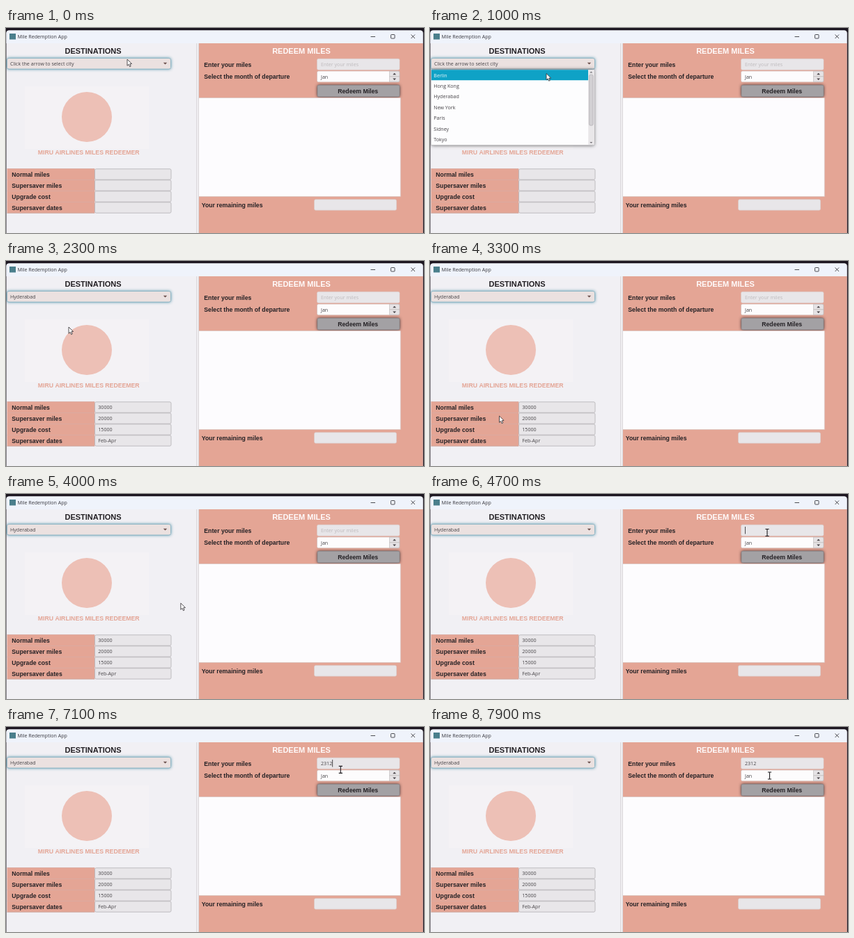
Write an HTML page with a canvas that moves like this. It is 600 px wide and 295 px high and loops after 8000 ms.

```html
<!DOCTYPE html>
<html lang="en">
<head>
<meta charset="utf-8">
<title>Mile Redemption App</title>
<style>
  html, body { margin: 0; width: 100%; height: 100%; overflow: hidden; background: #1c1620; }
  canvas { display: block; width: 600px; height: 295px; }
</style>
</head>
<body>
<canvas id="stage"></canvas>
<script>
const canvas = document.getElementById('stage');
const ctx = canvas.getContext('2d');
const ratio = window.devicePixelRatio || 1;
canvas.width = 600 * ratio;
canvas.height = 295 * ratio;

const LOOP = 8000, TICK = 100;
const OPEN = 400, PICK = 2200, FOCUS = 4400;
const KEYS = [6500, 6700, 6900, 7100];
const TYPED = '2312';
const BLINK = 500;
const UI = '"Open Sans", "Noto Sans", sans-serif';
const BOLD = '"Liberation Sans", Arial, sans-serif';
const PINK = '#e4a595', INK = '#242125', GREY = '#e8e6e9';
const CITIES = ['Berlin', 'Hong Kong', 'Hyderabad', 'New York', 'Paris', 'Sidney', 'Tokyo'];
const ROWS = [
  ['Normal miles', '30000'],
  ['Supersaver miles', '20000'],
  ['Upgrade cost', '15000'],
  ['Supersaver dates', 'Feb-Apr']
];
const LIST_Y = 60.2, ROW_H = 15.4;

// Pointer stops: time, x, y
const PATH = [
  [0, 174, 45], [400, 174, 45], [1000, 167, 65.5], [1100, 167, 65.5],
  [1600, 90, 94], [2300, 90, 95], [3000, 99.5, 223], [3700, 99.5, 223],
  [4400, 484, 55.5], [4800, 484, 55.5], [6200, 480, 61],
  [7000, 480, 61], [7800, 487.5, 70], [8000, 487.5, 70]
];

function pointer(t) {
  const i = Math.max(1, PATH.findIndex(p => p[0] > t));
  const [t0, x0, y0] = PATH[i - 1], [t1, x1, y1] = PATH[i];
  const k = (t - t0) / (t1 - t0), e = k * k * (3 - 2 * k);
  return { x: x0 + (x1 - x0) * e, y: y0 + (y1 - y0) * e };
}

function rect(x, y, w, h, fill) {
  ctx.fillStyle = fill;
  ctx.fillRect(x, y, w, h);
}

function box(x, y, w, h, r, fill, stroke, line = 0.8) {
  ctx.beginPath();
  ctx.roundRect(x, y, w, h, r);
  if (fill) { ctx.fillStyle = fill; ctx.fill(); }
  if (stroke) { ctx.strokeStyle = stroke; ctx.lineWidth = line; ctx.stroke(); }
}

function glow(color, blur, draw) {
  ctx.save();
  ctx.shadowColor = color;
  ctx.shadowBlur = blur * ratio;
  draw();
  ctx.restore();
}

function poly(points, fill) {
  ctx.beginPath();
  points.forEach(([x, y]) => ctx.lineTo(x, y));
  ctx.closePath();
  ctx.fillStyle = fill;
  ctx.fill();
}

function lines(color, width, ...segs) {
  ctx.beginPath();
  for (const [x0, y0, x1, y1] of segs) { ctx.moveTo(x0, y0); ctx.lineTo(x1, y1); }
  ctx.strokeStyle = color;
  ctx.lineWidth = width;
  ctx.stroke();
}

function text(str, x, y, color = '#474448', font = '7.1px ' + UI, align = 'left') {
  ctx.font = font;
  ctx.textAlign = align;
  ctx.fillStyle = color;
  ctx.fillText(str, x, y);
}

const bold = (str, x, y, color = INK, size = 8.7, align = 'left') =>
  text(str, x, y, color, `bold ${size}px ${BOLD}`, align);

// dir: 1 points down, -1 points up
function arrow(x, y, dir, size, color) {
  poly([[x - size, y - dir * size / 2], [x + size, y - dir * size / 2], [x, y + dir * size / 2]], color);
}

function drawWindow() {
  rect(0, 0, 600, 295, '#1c1620');
  box(0.5, 3.5, 598, 300, 4, '#f1f0f4');
  box(0.5, 3.5, 598, 18.5, [4, 4, 0, 0], '#eff3fb');
  rect(5, 8, 9, 8.5, '#4a7f8c');
  text('Mile Redemption App', 16.5, 15, '#3a3a40');
  lines('#3a3a40', 0.9,
    [523.5, 12.5, 530, 12.5], [581.5, 9.5, 587, 15], [587, 9.5, 581.5, 15]);
  box(552.5, 9.5, 5.5, 5.5, 0.8, null, '#3a3a40', 0.9);
  rect(273, 22, 4, 273, '#dcd9dc');
  rect(274, 22, 2, 273, '#efedf0');
  rect(277, 22, 321.5, 273, PINK);
}

function drawLeft(t) {
  const picked = t >= PICK;
  bold('DESTINATIONS', 125, 36.6, INK, 11, 'center');

  glow('rgba(20,110,140,0.85)', 4, () => box(1.5, 43.5, 235, 15.5, 2.5, '#ebe1e0'));
  box(1.5, 43.5, 235, 15.5, 2.5, '#ebe1e0', '#83b1c2');
  text(picked ? 'Hyderabad' : CITIES.length && 'Click the arrow to select city', 6, 54);
  arrow(228.5, 51.2, 1, 2.7, '#6b504c');

  rect(27, 83.5, 178.5, 90.5, '#f4f2f5');
  ctx.beginPath();
  ctx.arc(116, 128, 36, 0, Math.PI * 2);
  ctx.fillStyle = '#edc0b6';
  ctx.fill();
  bold('MIRU AIRLINES MILES REDEEMER', 118.7, 182, '#e4a595', 8.7, 'center');

  ROWS.forEach(([label, value], i) => {
    const y = 202.5 + i * 16;
    rect(1.5, y, 126, 16, PINK);
    lines('#d3a297', 0.6, [1.5, y, 127, y]);
    box(127.5, y + 0.3, 109.5, 15.4, 2, GREY, '#b3b0b4');
    bold(label, 8.3, y + 11.1);
    if (picked) text(value, 132.3, y + 10.8);
  });
  lines('#c9aaa4', 0.8, [1.5, 266.3, 127, 266.3]);
}

function drawRight(t) {
  bold('REDEEM MILES', 424, 36.6, '#fffafa', 11, 'center');
  bold('Enter your miles', 284.3, 55.6);
  bold('Select the month of departure', 284.3, 73.2);

  box(446.5, 44.3, 118.5, 16, 2, GREY, '#d9cbc9', 0.6);
  if (t < FOCUS) {
    text('Enter your miles', 452, 55, '#bebabd');
  } else {
    const count = KEYS.filter(k => t >= k).length;
    const str = TYPED.slice(0, count);
    text(str, 452, 55);
    const since = t - (count ? KEYS[count - 1] : FOCUS);
    if (Math.floor(since / BLINK) % 2 === 0)
      rect(452 + ctx.measureText(str).width, 47, 0.9, 10.5, '#3c393d');
  }

  box(446.5, 62, 118.5, 15.8, 2, '#fdfcfd', '#cdbbb8', 0.6);
  box(550.5, 62.2, 14.3, 7.6, [0, 2, 0, 0], '#e6e3e5', '#b9b4b6', 0.6);
  box(550.5, 69.9, 14.3, 7.7, [0, 0, 2, 0], '#e6e3e5', '#b9b4b6', 0.6);
  arrow(557.6, 66, -1, 2.4, '#454145');
  arrow(557.6, 73.8, 1, 2.4, '#454145');
  text('Jan', 452, 72.6);

  glow('rgba(30,20,25,0.9)', 4.5, () => box(447, 82.3, 118, 16.6, 2, '#a3a1a4'));
  box(447, 82.3, 118, 16.6, 2, '#a3a1a4', '#858286', 0.7);
  bold('Redeem Miles', 505.2, 93.5, INK, 8.7, 'center');

  rect(277, 100.5, 289.3, 142, '#fdfcfe');
  lines('#d9c5c2', 0.7, [277, 100.5, 566.3, 100.5], [566.3, 100.5, 566.3, 242.5], [277, 242.5, 566.3, 242.5]);
  bold('Your remaining miles', 280.8, 257.7);
  box(442.5, 246.7, 118, 15.5, 2, GREY, '#d9cbc9', 0.6);
}

function drawList(t, p) {
  glow('rgba(0,0,0,0.6)', 5, () => rect(1.5, 60, 234.5, 108.5, '#fdfdfe'));
  box(1.5, 60, 234.5, 108.5, 0, '#fdfdfe', '#b5b3b7', 0.7);
  const hover = Math.floor((p.y - LIST_Y) / ROW_H);
  CITIES.forEach((city, i) => {
    const y = LIST_Y + i * ROW_H, on = i === hover;
    if (on) rect(2, y, 225, ROW_H - 0.4, '#0fa2c6');
    else if (i === 0) box(2.6, y + 0.8, 223, ROW_H - 1.8, 0, null, '#4bb5d2', 1);
    text(city, 5.3, y + 10.4, on ? '#e6f6fa' : '#474448');
  });
  rect(227.2, 60.4, 8.4, 107.7, '#e9e7e9');
  box(228.4, 67.2, 5.8, 73, 2, '#d2d0d3', '#aaa7ab', 0.6);
  arrow(231.3, 63.6, -1, 2, '#757277');
  arrow(231.3, 165, 1, 2, '#757277');
}

function drawPointer({ x, y }) {
  if (x > 446 && x < 550 && y > 44 && y < 78) {
    lines('#1d1a1e', 1.1,
      [x, y - 4.8, x, y + 4.8], [x - 2.6, y - 5, x + 2.6, y - 5], [x - 2.6, y + 5, x + 2.6, y + 5]);
    return;
  }
  const shape = [[0, 0], [0, 9.3], [2.1, 7.3], [3.6, 10.7], [5.2, 10], [3.8, 6.7], [6.6, 6.5]];
  poly(shape.map(([a, b]) => [x + a, y + b]), '#fff');
  ctx.strokeStyle = '#2c292d';
  ctx.lineWidth = 0.8;
  ctx.stroke();
}

function draw(t) {
  const p = pointer(t);
  ctx.setTransform(ratio, 0, 0, ratio, 0, 0);
  drawWindow();
  drawLeft(t);
  drawRight(t);
  if (t >= OPEN && t < PICK) drawList(t, p);
  drawPointer(p);
}

const start = performance.now();
function frame() {
  const t = (performance.now() - start) % LOOP;
  draw(Math.floor(t / TICK) * TICK);
  requestAnimationFrame(frame);
}
draw(0);
requestAnimationFrame(frame);
</script>
</body>
</html>
```
